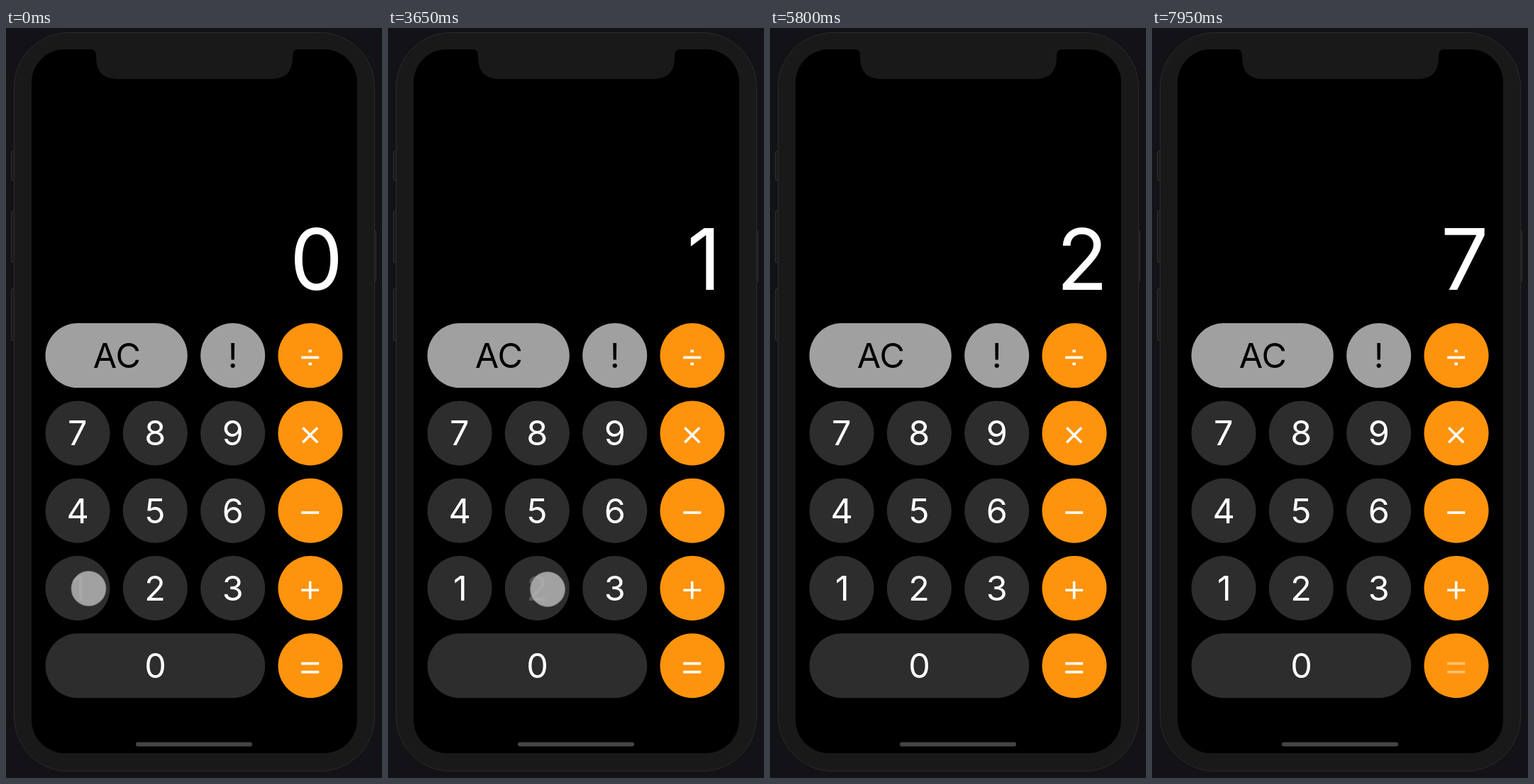
An HTML page that plays this animation: 530x1057 px, repeating every 8000 ms.

```html
<!DOCTYPE html>
<html lang="en">
<head>
<meta charset="utf-8">
<title>Calculator</title>
<style>
  html, body { margin: 0; width: 100%; height: 100%; overflow: hidden; background: #121217; }
  svg { display: block; width: 530px; height: 1057px; }
  text { font-family: Inter, Roboto, sans-serif; font-weight: 400; }
  .digit .face { fill: #2d2d2d; }
  .tool .face { fill: #a0a0a0; }
  .op .face { fill: #fe930d; }
  .label { fill: #fff; }
  .tool .label { fill: #000; }
  .op path { fill: none; stroke: #fff; stroke-width: 3.6; }
  .side { fill: #1b1b1d; stroke: #303032; }
</style>
</head>
<body>
<svg viewBox="0 0 530 1057">
  <g class="side">
    <rect x="7.5" y="173.5" width="6" height="41" rx="2"/>
    <rect x="7.5" y="257.5" width="6" height="73" rx="2"/>
    <rect x="7.5" y="367.5" width="6" height="73" rx="2"/>
    <rect x="516.5" y="285.5" width="5" height="73" rx="2"/>
  </g>
  <rect x="11.5" y="6.5" width="508" height="1041" rx="77" fill="#191919" stroke="#2b2b2c"/>
  <rect x="36" y="30" width="459" height="992" rx="47"/>
  <path d="M119 30q8 0 8 9v3q0 30 31 30h215q31 0 31-30v-3q0-9 8-9z" fill="#191919"/>
  <rect x="183" y="1006.500" width="164" height="6" rx="3" fill="#454545"/>
  <g id="keys"></g>
  <text id="display" class="label" y="369" font-size="119"></text>
  <circle id="touch" r="24.5" fill="#bfbfbf" fill-opacity=".8" stroke="#7c7c7c" stroke-opacity=".8"/>
</svg>
<script>
const LOOP = 8000, FADE = 300, DIM = 0.2;
const COLS = [101, 210.3, 319.7, 429];
const RADIUS = 45.5;
const pen = document.createElement('canvas').getContext('2d');
const keysLayer = document.getElementById('keys');
const display = document.getElementById('display');
const touch = document.getElementById('touch');
const labels = {};

// Operator strokes, relative to the glyph centre.
const SIGNS = {
  '÷': 'M-12.500 0h25M-2.300-9h4.600M-2.300 9h4.600',
  '×': 'M-10.500-10.500l21 21m0-21l-21 21',
  '−': 'M-12.500 0h25',
  '+': 'M-12.500 0h25M0-12.500v25',
  '=': 'M-12.500-6h25M-12.500 6h25'
};

function make(tag, attrs, parent) {
  const node = document.createElementNS('http://www.w3.org/2000/svg', tag);
  for (const name in attrs) node.setAttribute(name, attrs[name]);
  return parent.appendChild(node);
}

// Start x that centres the ink of a string on cx.
function inkStart(text, size, cx) {
  pen.font = `400 ${size}px Inter, Roboto, sans-serif`;
  const m = pen.measureText(text);
  return cx - (m.actualBoundingBoxRight - m.actualBoundingBoxLeft) / 2;
}

function addKey(name, kind, row, from, to = from) {
  const y = 461.6 + row * 109.3;
  const cx = (COLS[from] + COLS[to]) / 2;
  const group = make('g', { class: kind }, keysLayer);
  make('rect', {
    class: 'face', x: COLS[from] - RADIUS, y: y - RADIUS,
    width: COLS[to] - COLS[from] + 2 * RADIUS, height: 2 * RADIUS, rx: RADIUS
  }, group);
  if (SIGNS[name]) {
    labels[name] = make('path', { d: SIGNS[name], transform: `translate(428.700 ${y + 2.8})` }, group);
  } else {
    const size = 48.5;
    labels[name] = make('text', {
      class: 'label', x: inkStart(name, size, cx), y: y + 17.5, 'font-size': size
    }, group);
    labels[name].textContent = name;
  }
}

addKey('AC', 'tool', 0, 0, 1);
addKey('!', 'tool', 0, 2);
['789', '456', '123'].forEach((digits, row) =>
  [...digits].forEach((digit, col) => addKey(digit, 'digit', row + 1, col)));
addKey('0', 'digit', 4, 0, 2);
Object.keys(SIGNS).forEach((sign, row) => addKey(sign, 'op', row, 3));

// shown: value on the display once the key is released
const PRESSES = [
  { key: '1', x: 116.5, y: 790, down: 0, up: 50, shown: '1' },
  { key: '+', x: 428, y: 799, down: 1600, up: 1950, shown: '1' },
  { key: '2', x: 225, y: 791, down: 3650, up: 3850, shown: '2' },
  { key: '×', x: 437.5, y: 576, down: 4900, up: 5200, shown: '2' },
  { key: '3', x: 334, y: 790, down: 6000, up: 6550, shown: '3' },
  { key: '=', x: 450, y: 900, down: 7650, up: 7850, shown: '7' }
];
const DIGIT_CENTRE = { 0: 437.5, 1: 442.7, 2: 440.3, 3: 438, 7: 440.5 };

function show(value) {
  if (display.textContent === value) return;
  display.textContent = value;
  display.setAttribute('x', inkStart(value, 119, DIGIT_CENTRE[value]));
}

function draw(t) {
  let value = '0', finger = null;
  for (const p of PRESSES) {
    let opacity = 1;
    if (t >= p.up) {
      value = p.shown;
      const k = Math.min((t - p.up) / FADE, 1);
      opacity = DIM + (1 - DIM) * k * k * (3 - 2 * k);
    } else if (t >= p.down) {
      finger = p;
      opacity = DIM;
    }
    labels[p.key].setAttribute('opacity', opacity);
  }
  show(value);
  touch.setAttribute('visibility', finger ? 'visible' : 'hidden');
  if (finger) {
    touch.setAttribute('cx', finger.x);
    touch.setAttribute('cy', finger.y);
  }
}

const start = performance.now();
function tick() {
  draw((performance.now() - start) % LOOP);
  requestAnimationFrame(tick);
}
tick();
</script>
</body>
</html>
```
